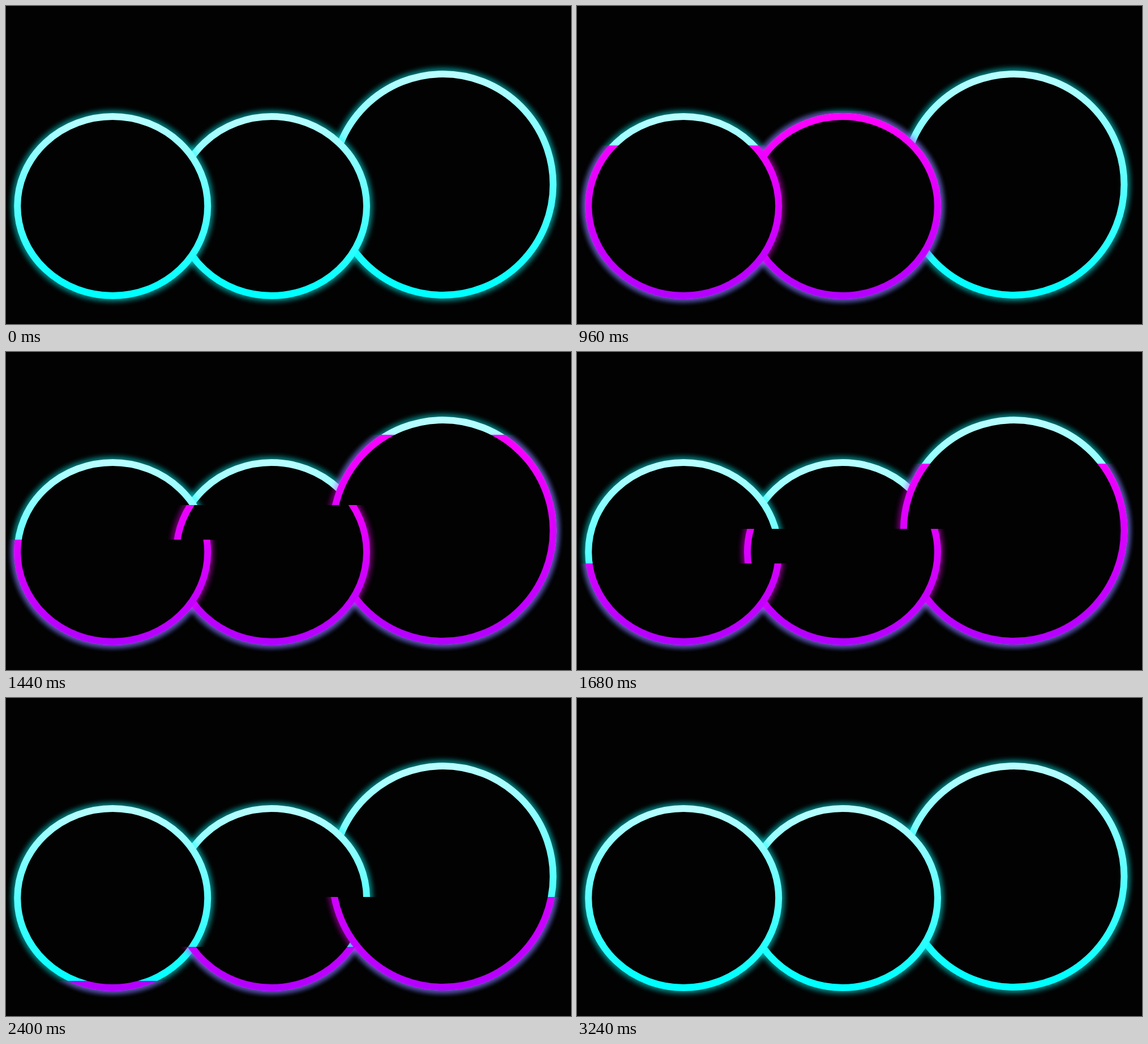
An HTML page for the animation above (4000 ms loop, 998 by 561 pixels).

```html
<!DOCTYPE html>
<html lang="en">
<head>
<meta charset="utf-8">
<title>Neon rings</title>
<style>
html, body { margin: 0; width: 100%; height: 100%; overflow: hidden; background: #020202; }
svg { display: block; width: 100vw; height: 100vh; }
</style>
</head>
<body>
<svg id="stage" viewBox="0 0 998 561" preserveAspectRatio="none">
  <defs>
    <linearGradient id="cyan" x1="0" y1="0" x2="0" y2="1">
      <stop offset="0" stop-color="#b8fdff"/>
      <stop offset=".97" stop-color="#00ffff"/>
    </linearGradient>
    <linearGradient id="pink" x1="0" y1="0" x2="0" y2="1">
      <stop offset="0" stop-color="#ff00ff"/>
      <stop offset="1" stop-color="#b400ff"/>
    </linearGradient>
    <filter id="blur" x="-15%" y="-15%" width="130%" height="130%" color-interpolation-filters="sRGB">
      <feGaussianBlur stdDeviation="4"/>
    </filter>
  </defs>
</svg>
<script>
const NS = 'http://www.w3.org/2000/svg';
const LOOP = 4000, STEP = 40, WIPE = 2000, LINE = 12;
const stage = document.getElementById('stage');

// show: pink ring appears; start: its wipe begins, moving from top to bottom
const rings = [
  { cx: 188.2, cy: 353, rx: 168, ry: 158, show: 440, start: 562, top: 176, bottom: 528 },
  { cx: 469, cy: 353, rx: 168, ry: 158, show: 800, start: 908, top: 176, bottom: 528 },
  { cx: 771.6, cy: 315, rx: 194.8, ry: 195, show: 1120, start: 1230, top: 101, bottom: 529 }
];

function add(parent, tag, attrs) {
  const el = document.createElementNS(NS, tag);
  for (const key in attrs) el.setAttribute(key, attrs[key]);
  return parent.appendChild(el);
}

function drawRing(parent, { cx, cy, rx, ry }, paint, glow, alpha) {
  const grow = LINE / 2 + 5;
  add(parent, 'ellipse', {
    cx, cy, rx: rx + grow, ry: ry + grow,
    fill: glow, 'fill-opacity': alpha, filter: 'url(#blur)'
  });
  add(parent, 'ellipse', {
    cx, cy, rx, ry, fill: '#020202', stroke: `url(#${paint})`, 'stroke-width': LINE
  });
}

const stack = [...rings].reverse();
stack.forEach(r => drawRing(add(stage, 'g'), r, 'cyan', '#00ffff', 0.48));
stack.forEach((r, i) => {
  const clip = add(stage.querySelector('defs'), 'clipPath', { id: 'wipe' + i });
  r.window = add(clip, 'rect', { x: 0, y: 0, width: 998, height: 561 });
  r.group = add(stage, 'g', { 'clip-path': `url(#wipe${i})` });
  drawRing(r.group, r, 'pink', '#ff00ff', 0.4);
});

function render(time) {
  const t = Math.floor((time % LOOP) / STEP) * STEP;
  for (const r of rings) {
    const p = (t - r.start) / WIPE;
    const on = t >= r.show && p < 1;
    r.group.setAttribute('visibility', on ? 'visible' : 'hidden');
    const y = p > 0 ? Math.round(r.top + (r.bottom - r.top) * p) : 0;
    r.window.setAttribute('y', y);
  }
}

const begin = performance.now();
function tick() {
  render(performance.now() - begin);
  requestAnimationFrame(tick);
}
tick();
</script>
</body>
</html>
```
